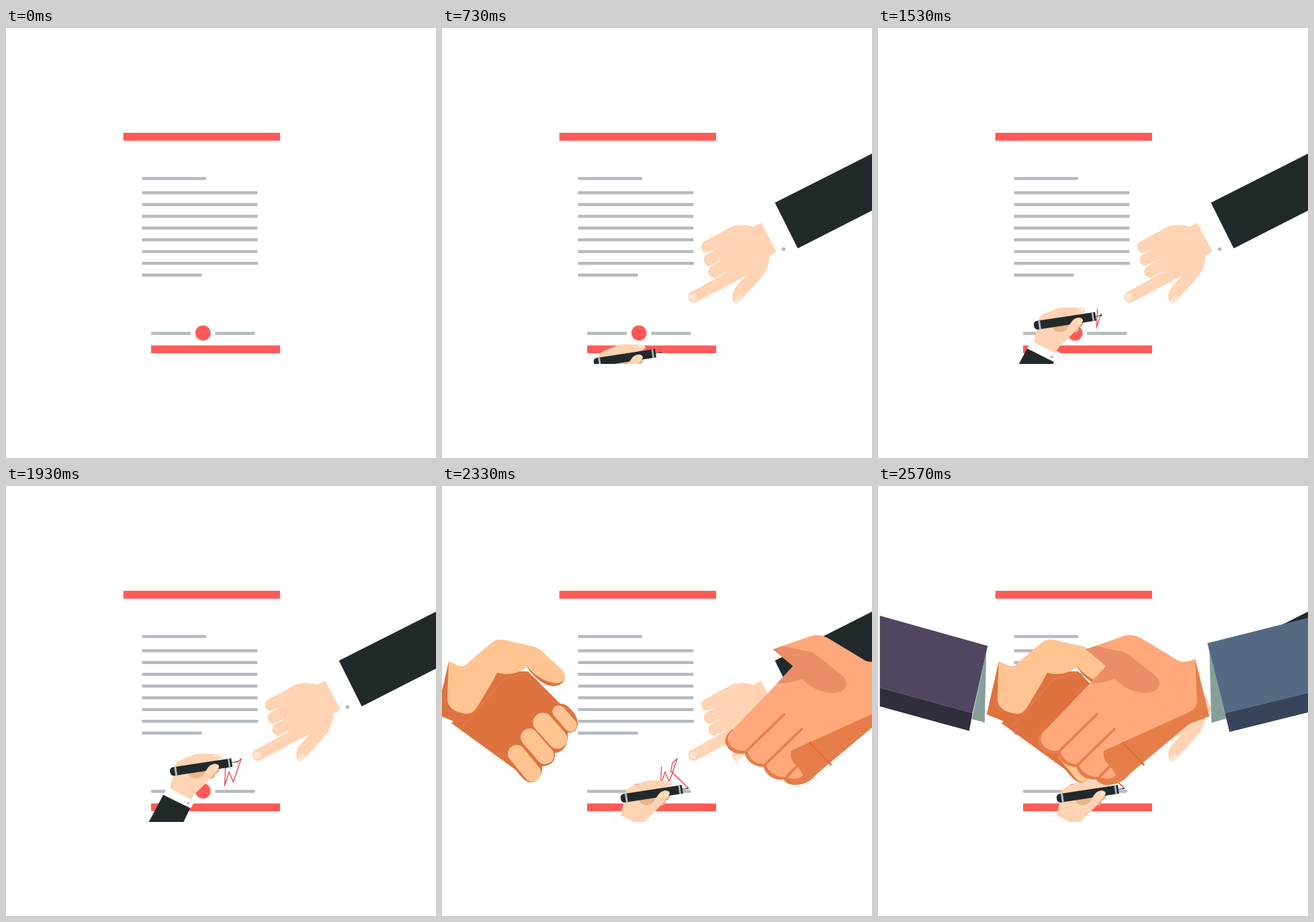
Animation of 640 by 640 pixels, one loop 3410 ms. Source, as an HTML page with a canvas:

```html
<!DOCTYPE html>
<html lang="en">
<head>
<meta charset="utf-8">
<title>Signing and shaking hands</title>
<style>
  html, body { margin: 0; width: 100%; height: 100%; overflow: hidden; background: #fff; }
  canvas { display: block; width: 640px; height: 640px; }
</style>
</head>
<body>
<canvas id="stage" width="640" height="640"></canvas>
<script>
const ctx = document.getElementById('stage').getContext('2d');
const LOOP = 3410, FPS = 30;

const RED = '#ff5a57', GRAY = '#b5babf', INK = '#22292b';
const SKIN = '#ffd3b3', NAIL = '#ffe4d2', SHADE = '#e8b48b';
const TAN = '#ffc491', RUST = '#de7340';
const PEACH = '#ffa87b', CLAY = '#e67e4b', ROSE = '#ea8e67';
const CUFF = '#879f99';

function fill(d, color) {
  ctx.fillStyle = color;
  ctx.fill(new Path2D(d));
}

function line(d, color, width, cap = 'round') {
  ctx.strokeStyle = color;
  ctx.lineWidth = width;
  ctx.lineCap = cap;
  ctx.stroke(new Path2D(d));
}

function oval(x, y, rx, ry = rx, angle = 0, color) {
  ctx.fillStyle = color;
  ctx.beginPath();
  ctx.ellipse(x, y, rx, ry, angle, 0, Math.PI * 2);
  ctx.fill();
}

function box(x, y, w, h, color, radius = 0) {
  ctx.fillStyle = color;
  ctx.beginPath();
  ctx.roundRect(x, y, w, h, radius);
  ctx.fill();
}

function shifted(dx, dy, draw) {
  ctx.save();
  ctx.translate(dx, dy);
  draw();
  ctx.restore();
}

function paper() {
  const textLine = (x1, x2, y) => box(x1, y - 2.3, x2 - x1, 4.6, GRAY, 0.7);
  box(174.7, 156, 233.3, 11.8, RED);
  box(216, 472.4, 192, 11.7, RED);
  textLine(202.5, 298, 224);
  for (let i = 0; i < 6; i++) textLine(202.5, 374.3, 245.2 + i * 17.5);
  textLine(202.5, 375, 350.2);
  textLine(202.5, 291.5, 367.7);
  textLine(216, 275, 454.5);
  textLine(311.3, 370.5, 454.5);
  oval(293.2, 454, 11.3, 11.3, 0, RED);
}

function pointingHand() {
  fill('M495.5 260 L529.5 328 L800 190 L800 106Z', INK);
  oval(508.4, 329, 2.8, 2.8, 0, GRAY);
  fill('M475 290 L463 296 C450 291 435 293 427 298 L390 318 C383 322 385 334 394 334.5' +
    'L405 330 L405.5 331 L394 337 C387 341 389 353 398 354 L414 346.3 L414.5 347.3' +
    'L400 355 C393 360 397 372 406 372 L423 363 L423.5 364.2 L370 393.5' +
    'C363 399 368 411 377 408.7 L452 369 C444 379 436 386 434 391 C431 397 432 404 434.5 408' +
    'C437 411 441 410 443 407 L474 373 C484 361 487 350 487.5 339 L498 333Z', SKIN);
  oval(374, 400.6, 6, 5.5, -0.5, NAIL);
  line('M442.5 401 L438.5 406.5', NAIL, 7);
}

// Drawn with the nib at (327, 435.7).
function writingHand() {
  fill('M216 485 L256 505 L225 570 L171 570Z', INK);
  fill('M222.5 474 L265 491 L257 505 L216 485Z', '#fff');
  oval(253, 497.5, 1.9, 1.9, 0, GRAY);
  oval(294, 448.5, 6, 5, -0.8, SHADE);
  oval(288, 456.5, 5.5, 4.5, -0.7, SHADE);
  fill('M226 475.5 L231 455 C232 443 233 437 241 433.5 L261 425.5 C266 423.5 272 423.6 298 424.6' +
    'C305 426 304 432 297 433 L272 442 L274 455 L284 462 L270 477 C265 481 262 484 258 492Z', SKIN);
  oval(296.8, 427.3, 5.4, 2.4, 0.05, NAIL);
  oval(266, 451, 12.5, 9.5, -0.15, SHADE);
  ctx.save();
  ctx.translate(327, 435.7);
  ctx.rotate(-0.152);
  box(-9, -0.7, 9, 1.4, '#6a6d6e');
  box(-3, -0.6, 3, 1.2, INK);
  box(-102, -6.4, 93, 12.8, INK, [5, 0, 0, 5]);
  box(-95, -6.4, 3, 12.8, GRAY);
  box(-14.5, -6.4, 2.6, 12.8, GRAY);
  ctx.restore();
  fill('M270 461 C280 454 280 442 290 439.5 C297 437.5 301 442 298 446 L285 462' +
    'L270 477 C262 482 256 477 258 468Z', SKIN);
  line('M295.8 443.5 L293.8 446.3', NAIL, 4.5);
}

function leftShaker() {
  fill('M3 193 L163.5 238 L141 338 L3 300Z', '#50465f');
  fill('M3 300 L141 338 L136 364.5 L3 328Z', '#302d3c');
  fill('M161.5 246 L159 352 L140 347Z', CUFF);
  shifted(174, 0, () => {
    fill('M-12 340 L6 261 L40 285 L78 275 L124 276 L172 324 C185 323 200 345 198 355' +
      'C197 366 190 367 183 367 C185 385 176 397 164 397 C166 410 157 417 145 417' +
      'C146 432 138 441 128 441 C120 441 114 433 105 422 L10 353 L13 350Z', RUST);
    line('M26 358 L88 287 L122 278', '#e78d5c', 0.8);
    line('M170 336 L187.5 356', TAN, 19);
    line('M146 352 L168 376.5', TAN, 29);
    line('M126 374 L149.5 401', TAN, 26);
    line('M107 398.5 L130.5 427', TAN, 26);
    fill('M122 269 C135 288 150 298 163 298 C174 297 179 290 179 283Z', RUST);
    fill('M6 261 L20 267 C28 270 32 267 36 262 L70 233 C76 228 82 228 88 229 L130 238.5' +
      'C138 240 142 243 147 248 L174 273 C183 283 179 294 165 293.5 C150 292 135 283 123 269' +
      'C112 277 100 283 78 278 C72 290 63 305 55 318 C47 332 42 340 32 339' +
      'C15 337 4 330 4 316Z', TAN);
  });
}

function rightShaker() {
  fill('M490 234 L700 181 L700 293 L516 338Z', '#536a82');
  fill('M516 338 L700 293 L700 322 L523 366Z', '#384459');
  fill('M493 245 L496 352.5 L518 346Z', CUFF);
  // dark underside
  fill('M472 258 L493 343 L463 354 L375 428 C365 440 355 445 341 445 C333 445 327 441 325 437' +
    'C311 439 298 430 295 418 C281 418 270 410 267 398 C252 401 239 392 238 379' +
    'C238 372 243 368 247 363 L400 280Z', CLAY);
  // back of the hand and fingers
  fill('M309 243 L365 223.5 C374 220.5 384 222 392 227 L445 259 C452 263 458 262 472 258' +
    'L474.5 315 C475 328 472 332 460 338 L336 394 C334 403 338 412 345 416' +
    'C349 422 352 427 354 431 C346 437 335 437 330 433 C316 434 303 428 298 414' +
    'C287 415 273 408 271 393 C256 397 243 388 242 377 C242 371 245 367 249 363' +
    'L315 294 L339 268Z', PEACH);
  fill('M309 243 L324 238 L360 246 C367 247 372 250 378 255 L412 282 C420 289 422 297 413 304' +
    'C405 309 393 309 380 305 C368 301 360 294 352 287 C342 291 330 294 315 294 L339 268Z', ROSE);
  line('M325.5 340 L271 393 M351.5 362 L298 414 M345 417 L330 432', CLAY, 3.8);
  line('M364 382 L395 414.5', '#dd713d', 3.2);
}

// Nib positions: time, x, y. The first stretch is the hand rising into view.
const nibKeys = [
  [565, 327, 509], [1145, 326.5, 418], [1340, 325.6, 445], [1520, 332, 425.5],
  [1610, 338.3, 440.5], [1870, 350, 406], [1960, 343, 412], [2040, 340.6, 424.5],
  [2300, 366.8, 450]
];

function nibAt(t) {
  const next = nibKeys.findIndex(key => key[0] > t);
  if (next < 0) return nibKeys[nibKeys.length - 1].slice(1);
  const [t0, x0, y0] = nibKeys[next - 1], [t1, x1, y1] = nibKeys[next];
  const k = (t - t0) / (t1 - t0);
  return [x0 + (x1 - x0) * k, y0 + (y1 - y0) * k];
}

function scribble(t, nib) {
  const points = nibKeys.slice(1).filter(key => key[0] <= t).map(key => key.slice(1));
  if (points.length) line('M' + [...points, nib].map(p => p.join(' ')).join('L'), '#e8262c', 1.1);
}

function writing(t) {
  const nib = nibAt(t);
  scribble(t, nib);
  ctx.save();
  ctx.beginPath();
  ctx.rect(0, 0, 640, 500);
  ctx.clip();
  shifted(nib[0] - 327, nib[1] - 435.7, writingHand);
  ctx.restore();
}

function draw(t) {
  ctx.fillStyle = '#fff';
  ctx.fillRect(0, 0, 640, 640);
  paper();
  if (t >= 195) {
    const away = Math.max(0, 433 - t) * 1.1;
    shifted(away, -0.54 * away, pointingHand);
  }
  if (t >= 566) writing(t);
  if (t >= 2050) {
    const left = Math.max(0, 2567 - t);
    shifted(-0.7275 * left, 0, leftShaker);
    shifted(0.7855 * left, 0, rightShaker);
  }
}

const start = performance.now();
function tick() {
  const t = (performance.now() - start) % LOOP;
  draw(Math.floor((t + 4) * FPS / 1000) * 1000 / FPS);
  requestAnimationFrame(tick);
}
tick();
</script>
</body>
</html>
```
